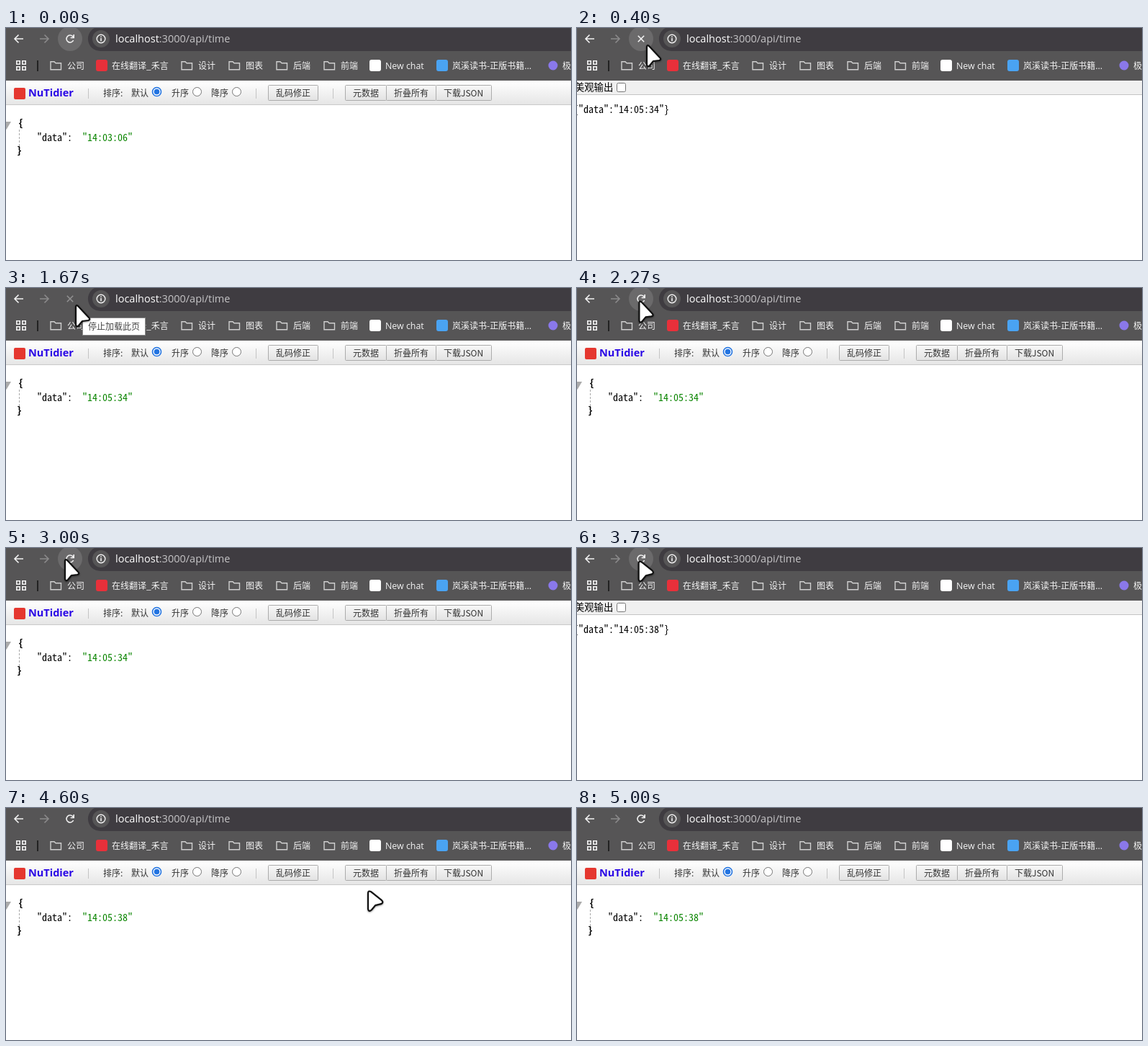
Animation of 785x322 px, one loop 5.94 s. Source, as an HTML page:

```html
<!DOCTYPE html>
<html lang="zh">
<head>
<meta charset="utf-8">
<title>Page reload</title>
<style>
html, body { margin: 0; width: 100%; height: 100%; overflow: hidden; background: #fff; }
svg { display: block; width: 785px; height: 322px; }
text { font: 12px "Noto Sans CJK SC", "Noto Sans CJK", "Noto Sans", sans-serif; white-space: pre; }
.latin { font-family: "Open Sans", "Noto Sans", sans-serif; }
.mono { font: 14px "Noto Sans Mono CJK SC", "Noto Sans Mono", monospace; }
.bold { font-weight: bold; }
.line { fill: none; stroke: #f2f2f2; stroke-width: 1.6; }
#cursor { filter: drop-shadow(0 1px 1px #0006); }
</style>
</head>
<body>
<svg viewBox="0 0 785 322">
  <defs>
    <linearGradient id="barFill" x2="0" y2="1">
      <stop stop-color="#fff"/><stop offset="1" stop-color="#e5e5e5"/>
    </linearGradient>
    <linearGradient id="btnFill" x2="0" y2="1">
      <stop stop-color="#f8f8f8"/><stop offset="1" stop-color="#e2e2e2"/>
    </linearGradient>
  </defs>

  <g id="strip">
    <path fill="#f0f0f0" d="M0 73H785V92H0Z"/>
    <path stroke="#c4c4c4" d="M0 92.5H785"/>
    <text x="-3" y="87" style="font-size:13.3px">美观输出</text>
    <rect x="55.5" y="76.5" width="12" height="12" rx="2" fill="#fff" stroke="#767676"/>
  </g>
  <text id="raw" class="mono" x="-5" y="118"></text>

  <g id="tools">
    <path fill="url(#barFill)" d="M0 73H785V107H0Z"/>
    <path stroke="#c9c9c9" d="M0 106.5H785"/>
    <rect x="11" y="83" width="16" height="16" rx="2" fill="#e5372f"/>
    <text class="latin bold" x="31" y="95" fill="#2a06e6" style="font-size:14.5px">NuTidier</text>
    <path stroke="#c4c4c4" d="M114.5 84V98M347.5 84V98M454.5 84V98"/>
    <g id="labels" fill="#333"></g>
  </g>

  <g id="json">
    <path fill="#aaa" d="M-6 130H7L.5 141Z"/>
    <path stroke="#aaa" stroke-dasharray="3 2" d="M18.5 141V164"/>
    <text class="mono bold" x="17" y="137">{</text>
    <text class="mono bold" x="15" y="175">}</text>
    <text class="mono" x="43" y="157">"data":</text>
    <text id="value" class="mono" x="106" y="157" fill="#0a8500"></text>
  </g>

  <path fill="#565556" d="M0 0H785V73H0Z"/>
  <path fill="#3f3c41" d="M785 0V32H132A17 17 0 0 1 123 0Z"/>
  <circle id="hover" cx="89" cy="15" r="17" fill="#6b6a6b"/>
  <path class="line" d="M24 15H12M17.5 9.5L12 15L17.5 20.5"/>
  <path class="line" d="M47 15H59M53.5 9.5L59 15L53.5 20.5" style="stroke:#8b8a8b"/>
  <path id="reload" class="line" d="M93.6 17A5 5 0 1 1 92.6 11.5L94 13M94.2 9V13.5H89.7"/>
  <path id="stop" class="line" d="M84.8 10.8L93.2 19.2M93.2 10.8L84.8 19.2"/>
  <circle cx="132" cy="15" r="12" fill="#565556"/>
  <circle class="line" cx="132" cy="15" r="5.8" style="stroke-width:1.4"/>
  <path class="line" d="M132 14V18.2M132 11.6V13"/>
  <text class="latin" x="152" y="20" fill="#c6c5c7" style="font-size:14.5px"><tspan fill="#fff">localhost</tspan>:3000/api/time</text>

  <path class="line" d="M14.8 45.8H19.2V50.2H14.8ZM22.8 45.8H27.2V50.2H22.8ZM14.8 53.8H19.2V58.2H14.8ZM22.8 53.8H27.2V58.2H22.8Z"/>
  <path stroke="#222" stroke-width="2" d="M44 45V60"/>
  <g id="marks" fill="#f4f4f4"></g>
  <rect x="125" y="44" width="16" height="16" rx="3" fill="#e8303a"/>
  <rect x="505" y="44" width="16" height="16" rx="3" fill="#fff"/>
  <rect x="598" y="44" width="16" height="16" rx="3" fill="#4aa3f2"/>
  <circle cx="760" cy="52" r="6.5" fill="#8a78ea"/>

  <g id="tip">
    <rect x="106.5" y="41.5" width="87" height="24" fill="#fff" stroke="#8a8a8a"/>
    <text x="114" y="58" fill="#444">停止加载此页</text>
  </g>
  <path id="cursor" fill="#fff" stroke="#111" stroke-width="2.2" stroke-linejoin="round"/>
</svg>
<script>
const LOOP = 5940;
const ARROW = "M2 3V28Q3 32 6 29L11 23L19 22Q23 21 20 18L5 2Q2 0 2 3Z";
const WEDGE = "M2 4V26Q3 31 7 27L12 21L20 19Q24 17 21 14L6 2Q2 0 2 4Z";
const $ = id => document.getElementById(id);

function add(parent, tag, attrs, text = "") {
  const el = document.createElementNS("http://www.w3.org/2000/svg", tag);
  for (const k in attrs) el.setAttribute(k, attrs[k]);
  el.textContent = text;
  $(parent).append(el);
}
const label = (parent, x, y, text) => add(parent, "text", { x, y }, text);

// bookmarks
[[85, "公司"], [267, "设计"], [333, "图表"], [399, "后端"], [465, "前端"]].forEach(([x, s]) => {
  label("marks", x, 56.5, s);
  add("marks", "path", { class: "line", style: "stroke:#cfcfcf;stroke-width:1.4",
    d: `M${x - 23} 46.7h5l2 2h7.5v9h-14.5z` });
});
label("marks", 147, 56.5, "在线翻译_禾言");
label("marks", 620, 56.5, "岚溪读书-正版书籍...");
label("marks", 773, 56.5, "极");
add("marks", "text", { x: 527, y: 56.5, class: "latin", style: "font-size:12.4px" }, "New chat");

// page toolbar
function button(x, w, text) {
  add("labels", "rect", { x: x + .5, y: 79.5, width: w, height: 21, rx: 1, fill: "url(#btnFill)", stroke: "#acacac" });
  label("labels", x + 11, 94.5, text);
}
[[135, "排序:"], [174, "默认"], [230, "升序"], [285, "降序"]].forEach(([x, s]) => label("labels", x, 94.5, s));
[209.5, 265.5, 320.5].forEach((cx, i) => {
  add("labels", "circle", { cx, cy: 88.5, r: 6, fill: "#fff", stroke: i ? "#767676" : "#2374e1", "stroke-width": i ? 1 : 1.6 });
  if (!i) add("labels", "circle", { cx, cy: 88.5, r: 3.8, fill: "#2374e1" });
});
button(364, 69, "乱码修正");
button(471, 57, "元数据");
button(528, 69, "折叠所有");
button(597, 77, "下载JSON");

const clamp = v => Math.max(0, Math.min(1, v));
const ramp = (t, from, to) => clamp((t - from) / (to - from));
const smooth = u => u * u * (3 - 2 * u);
const between = (t, a, b) => t >= a && t < b;
const show = (id, on) => $(id).setAttribute("visibility", on ? "visible" : "hidden");

// moves: start, end, from x/y, to x/y, bend of the path
const MOVES = [
  [0, 400, 150, 110, 95, 23, 1],
  [1900, 2480, 95, 23, 80, 15, 1],
  [3700, 4270, 80, 15, 508, 111, 3],
  [4570, 5000, 508, 111, 40, 326, 1]
];

function cursorAt(t) {
  const [a, b, x0, y0, x1, y1, bend] = MOVES.filter(m => t >= m[0]).pop();
  const p = smooth(ramp(t, a, b));
  return [x0 + (x1 - x0) * p, y0 + (y1 - y0) * (1 - (1 - p) ** bend)];
}

function draw(t) {
  const time = t < 70 ? "14:03:06" : t < 3730 ? "14:05:34" : "14:05:38";
  const raw = between(t, 70, 1070) || between(t, 3730, 3890);
  $("raw").textContent = `{"data":"${time}"}`;
  $("value").textContent = `"${time}"`;
  show("raw", raw);
  show("json", !raw);

  const fade = t < 70 ? 1 : t < 3730 ? ramp(t, 1090, 1560) : ramp(t, 3890, 4400);
  $("tools").setAttribute("opacity", fade);

  const stopping = between(t, 70, 1930);
  show("reload", !stopping);
  show("stop", stopping);
  $("stop").setAttribute("opacity", t < 930 ? 1 : .38);
  $("hover").setAttribute("opacity", t < 1930 ? 1 - ramp(t, 930, 1070)
    : ramp(t, 1930, 2130) - ramp(t, 3870, 4270));
  show("tip", between(t, 1670, 1930));

  const [x, y] = cursorAt(t);
  const press = 1 - .15 * Math.sin(Math.PI * ramp(t, 2770, 3000));
  show("cursor", between(t, 70, 5000));
  $("cursor").setAttribute("d", t < 3730 ? ARROW : WEDGE);
  $("cursor").setAttribute("transform", `translate(${x} ${y}) scale(${press})`);
}

const start = performance.now();
function tick() {
  draw((performance.now() - start) % LOOP);
  requestAnimationFrame(tick);
}
tick();
</script>
</body>
</html>
```
